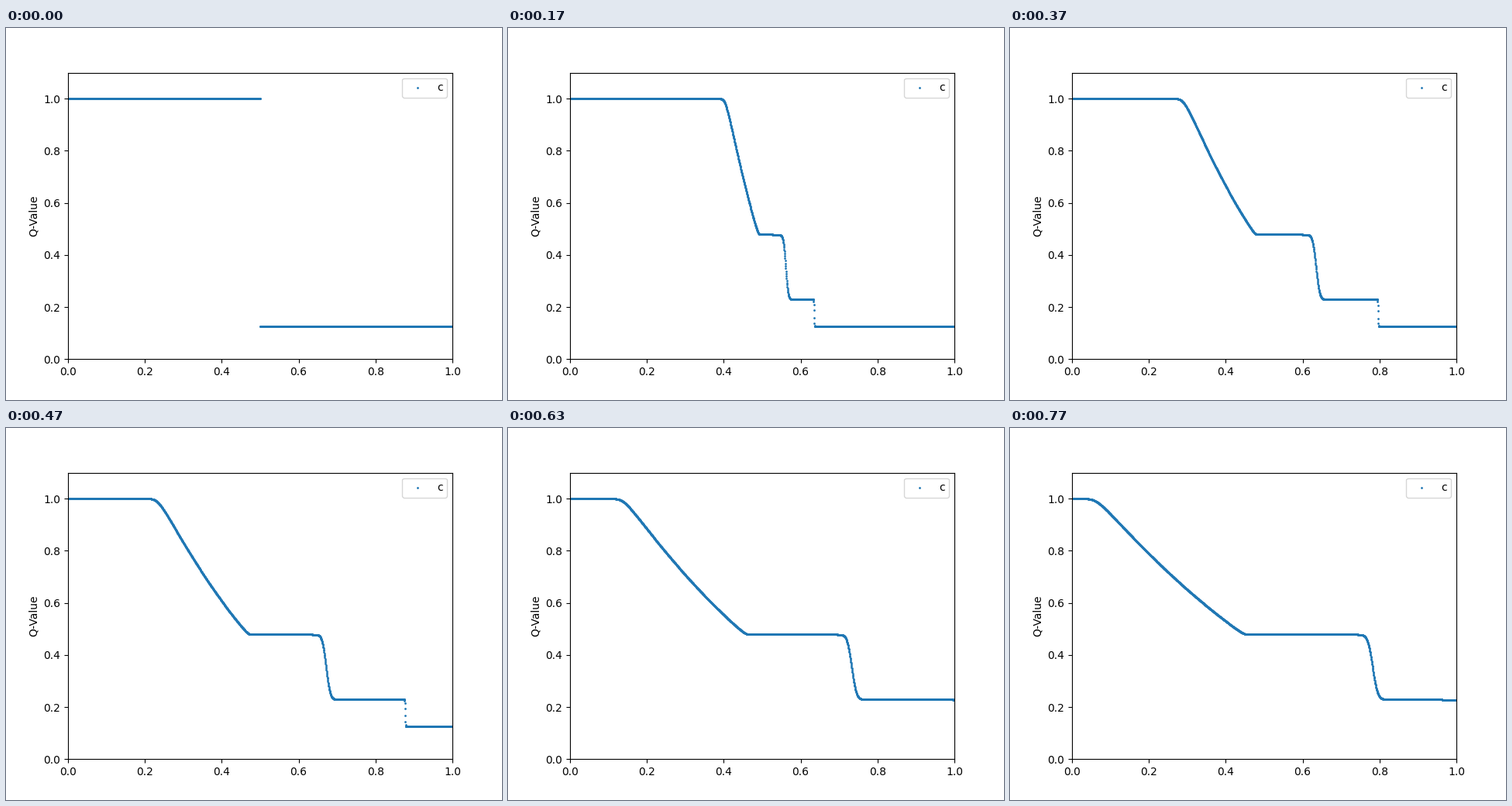
A matplotlib script that plays this animation: 640 px wide and 480 px high, repeating every 0.8 s.

```python
import numpy as np
import matplotlib.pyplot as plt
from matplotlib.animation import FuncAnimation

GAMMA = 5 / 3
CELLS = 2000
STATES = 24            # distinct pictures per loop
T_END = 0.35           # simulated time of one loop
STEPS = 112            # solver steps between two pictures
TICK, LOOP = 10, 800   # ms

dx = 1 / CELLS
dt = T_END / STATES / STEPS
x = (np.arange(CELLS) + 0.5) * dx


def conserved(rho, u, p):
    return np.array([rho, rho * u, p / (GAMMA - 1) + 0.5 * rho * u**2])


def hllc_flux(q):
    """First-order HLLC flux through every face between neighbouring cells."""
    rho, mom, en = q
    u = mom / rho
    p = (GAMMA - 1) * (en - 0.5 * mom * u)
    c = np.sqrt(GAMMA * p / rho)
    f = np.array([mom, mom * u + p, (en + p) * u])

    lo, hi = u - c, u + c
    s_l = np.minimum(lo[:-1], lo[1:])
    s_r = np.maximum(hi[:-1], hi[1:])
    w_l = rho[:-1] * (s_l - u[:-1])
    w_r = rho[1:] * (s_r - u[1:])
    s_m = (p[1:] - p[:-1] + w_l * u[:-1] - w_r * u[1:]) / (w_l - w_r)

    # pick the side of the contact wave that holds the face
    left = s_m >= 0

    def pick(a):
        return np.where(left, a[..., :-1], a[..., 1:])

    s = np.where(left, s_l, s_r)
    r, v, pr, e, qk = pick(rho), pick(u), pick(p), pick(en), pick(q)
    r_star = r * (s - v) / (s - s_m)
    e_star = e / r + (s_m - v) * (s_m + pr / (r * (s - v)))
    star = r_star * np.array([np.ones_like(s_m), s_m, e_star])
    s_cut = np.where(left, np.minimum(s_l, 0), np.maximum(s_r, 0))
    return pick(f) + s_cut * (star - qk)


def advance(q):
    for _ in range(STEPS):
        padded = np.concatenate([q[:, :1], q, q[:, -1:]], axis=1)
        flux = hllc_flux(padded)
        q = q - dt / dx * (flux[:, 1:] - flux[:, :-1])
    return q


def solve():
    """Density profiles of the shock tube, one per picture."""
    inside = x < 0.5
    q = conserved(np.where(inside, 1.0, 0.125),
                  np.zeros(CELLS),
                  np.where(inside, 1.0, 0.1))
    profiles = [q[0]]
    for _ in range(STATES - 1):
        q = advance(q)
        profiles.append(q[0])
    return profiles


profiles = solve()

fig, ax = plt.subplots(figsize=(6.4, 4.8), dpi=100)
dots = ax.scatter(x, profiles[0], s=1, label="c")
ax.set_xlim(0, 1)
ax.set_ylim(0, 1.1)
ax.set_ylabel("Q-Value")
ax.legend(loc="upper right")


def update(tick):
    k = int((tick + 0.5) * TICK * STATES / LOOP)
    dots.set_offsets(np.column_stack([x, profiles[k]]))
    return (dots,)


anim = FuncAnimation(fig, update, frames=LOOP // TICK, interval=TICK,
                     repeat=True, repeat_delay=0, blit=False)
plt.show()
```
